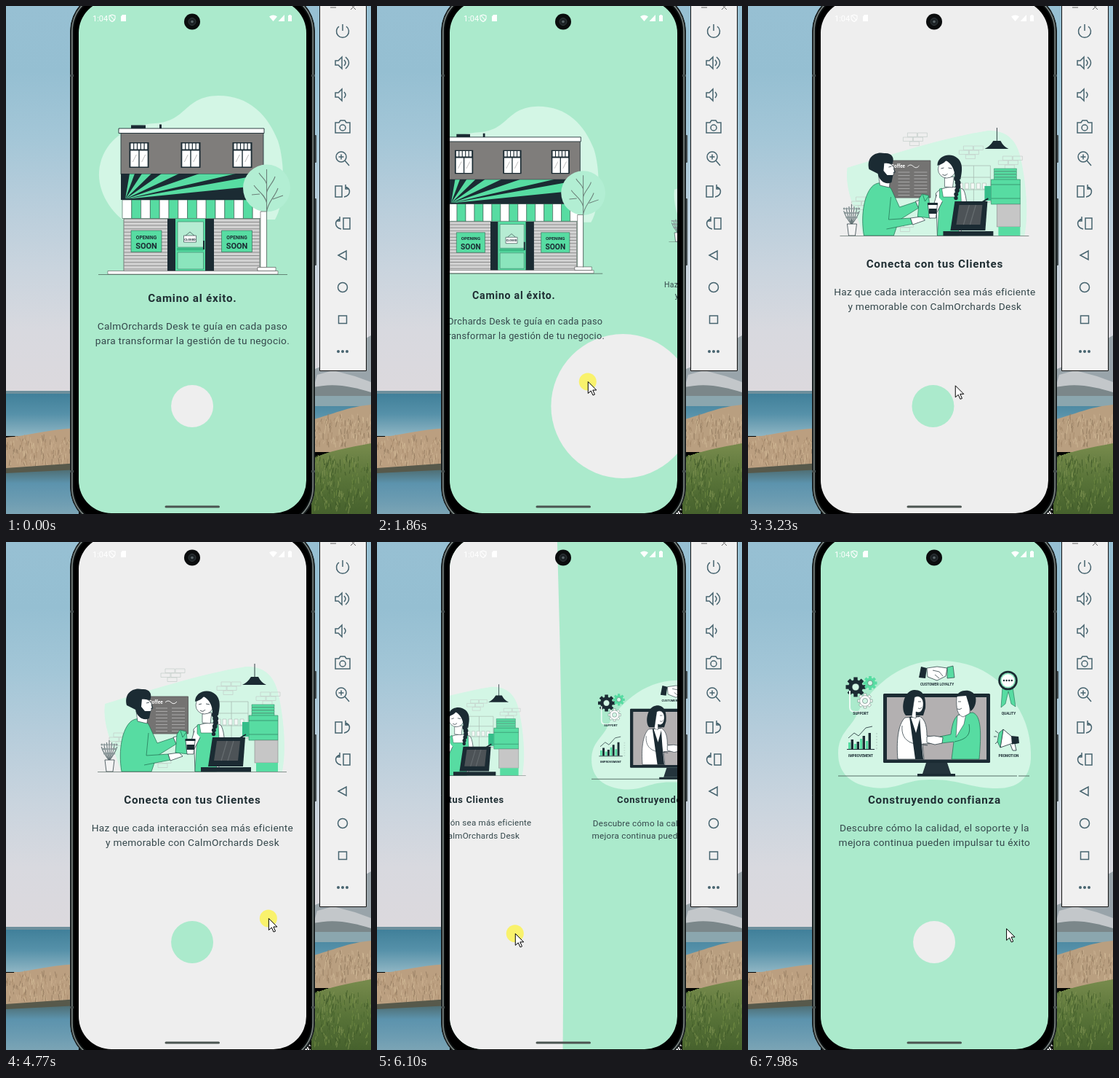
An HTML page with a canvas for the animation above (8 s loop, 502x697 px).

```html
<!DOCTYPE html>
<html lang="es">
<head>
<meta charset="utf-8">
<style>
html, body { margin: 0; width: 100%; height: 100%; overflow: hidden; background: #000; }
canvas { display: block; }
</style>
</head>
<body>
<canvas id="stage" width="502" height="697"></canvas>
<script>
const LOOP = 8000, W = 502, H = 697;
const INK = '#1b2b33', GREEN = '#57dca2', PALE = '#d3f6e5', MINT = '#abeacc', GREY = '#eeeeee';
const stage = document.getElementById('stage');
let c = stage.getContext('2d');

// ---------- drawing helpers ----------
function paint(p, fill, stroke, lw = 0.7) {
  if (fill) { c.fillStyle = fill; c.fill(p); }
  if (stroke) { c.strokeStyle = stroke; c.lineWidth = lw; c.stroke(p); }
}
const shape = (d, fill, stroke, lw) => paint(new Path2D(d), fill, stroke, lw);
function box(x, y, w, h, fill, stroke, lw, r = 0) {
  const p = new Path2D();
  p.roundRect(x, y, w, h, r);
  paint(p, fill, stroke, lw);
}
function disc(x, y, r, fill, stroke, lw) {
  const p = new Path2D();
  p.arc(x, y, r, 0, 7);
  paint(p, fill, stroke, lw);
}
function label(text, x, y, size, color, bold, spacing = 0, align = 'center') {
  c.font = `${bold ? 700 : 400} ${size}px Roboto, sans-serif`;
  c.letterSpacing = spacing + 'px';
  c.textAlign = align;
  c.fillStyle = color;
  c.fillText(text, x, y);
}
function vertical(y0, y1, ...colors) {
  const g = c.createLinearGradient(0, y0, 0, y1);
  colors.forEach((k, i) => g.addColorStop(i / (colors.length - 1), k));
  return g;
}
function seeded(seed) {
  return () => (seed = (seed * 16807) % 2147483647) / 2147483647;
}

// ---------- desktop, phone body, side panel ----------
function blades(x0, x1, y0, y1, n, colors) {
  const rnd = seeded(91 + n);
  c.lineWidth = 0.8;
  for (let i = 0; i < n; i++) {
    const x = x0 + rnd() * (x1 - x0), y = y0 + rnd() * (y1 - y0);
    c.strokeStyle = colors[i % colors.length];
    c.beginPath();
    c.moveTo(x, y);
    c.lineTo(x + rnd() * 4 - 2, y - 4 - rnd() * 5);
    c.stroke();
  }
}

function drawDesktop() {
  box(0, 0, W, 535, vertical(0, 535, '#97c0d3', '#95bfd2', '#a3c6d7', '#b7cddb', '#c9d4de', '#d8d9df', '#dcd9dd'));
  box(0, 530, W, 60, vertical(530, 590, '#3f7f99', '#5691a9', '#8fb5c3'));
  box(0, 528, 100, 4, '#6d8f9c');
  shape('M0 592C30 590 55 581 100 579V628L0 636Z', '#bb9f80');
  blades(0, 90, 596, 632, 170, ['#c9ae8d', '#a98c6d', '#d1b996', '#927a60']);
  box(0, 634, 100, 63, vertical(634, 697, '#4d6a6d', '#5c93ad', '#6a9bb1', '#7ba4b5'));
  shape('M0 634L100 627V636L0 641Z', '#57594b');
  shape('M420 500L440 492L470 470L502 452V533H420Z', '#99a4aa');
  shape('M428 506L450 500L480 508L502 516V534H420Z', '#c3c7ca');
  shape('M420 524C450 516 475 522 502 530V541H420Z', '#7b878a');
  box(420, 535, 82, 14, '#8ba6ae');
  shape('M420 568C450 560 470 550 502 547V612H420Z', '#b99f80');
  blades(424, 502, 566, 606, 150, ['#cbb292', '#a58a6b', '#d2bb99', '#8d775c']);
  shape('M420 622C445 610 470 606 502 600V697H420Z', vertical(605, 697, '#75894b', '#587338', '#46612d'));
  blades(424, 502, 622, 697, 230, ['#6f8a42', '#4a662e', '#3d5728', '#829653']);
}

function drawBody() {
  box(424, 177, 3, 38, '#3c4446', null, 0, 1);
  box(424, 264, 3, 92, '#3c4446', null, 0, 1);
  box(88.5, -20, 336, 735, '#0c1011', '#20282a', 1, 55);
  box(90.8, -18, 331.4, 731, null, '#79827f', 1.8, 53);
  box(93.5, -15, 326, 725, '#000', null, 0, 50);
  for (const y of [94, 637]) {
    box(88, y, 5, 3, '#444d4d');
    box(420, y, 5, 3, '#444d4d');
  }
}

function speaker(y, waves) {
  shape(`M453 ${y - 3}H457L462 ${y - 8}V${y + 8}L457 ${y + 3}H453Z`, null, '#47646f', 1.5);
  shape(`M465 ${y - 4}Q469 ${y} 465 ${y + 4}`, null, '#47646f', 1.5);
  if (waves > 1) shape(`M467 ${y - 8}Q476 ${y} 467 ${y + 8}`, null, '#47646f', 1.5);
}

function drawPanel() {
  const k = '#47646f', w = 1.5;
  box(431.5, -2, 64, 502.5, '#f0f0f0', '#111', 1);
  shape('M446 2H454M474 -2L481 5M481 -2L474 5', null, '#666', 1);
  shape('M458 28A8.5 8.5 0 1 0 468 28M463 25V34', null, k, w);
  speaker(78, 2);
  speaker(122, 1);
  shape('M453 160H458L460 157H466L468 160H473V174H453Z', null, k, w);
  disc(463, 167, 4, null, k, w);
  disc(461, 207, 7, null, k, w);
  shape('M466 212L472 219M457.5 207H464.5M461 203.5V210.5', null, k, w);
  shape('M453 247H462V262H453ZM465 262C474 260 475 251 467 248M467 245V251H472', null, k, w);
  shape('M464 291H473V306H464ZM461 306C452 304 451 295 459 292M459 289V295H454', null, k, w);
  shape('M457 342L468 336V348Z', null, k, w);
  disc(463, 386, 6.5, null, k, w);
  box(457.5, 425, 11, 10.5, null, k, w);
  for (const x of [457, 463, 469]) disc(x, 474, 2, k);
}

// ---------- illustrations ----------
function poster(x) {
  box(x - 21, 308, 42, 29.5, GREEN, '#2f5a4b', 0.6);
  label('OPENING', x, 319.5, 6.6, INK, true);
  label('SOON', x, 332.5, 11, INK, true);
}

function shutter(x, w) {
  box(x, 292, w, 72, '#d2d2d2', '#555', 0.7);
  for (let y = 296; y < 363; y += 4.6) box(x, y, w, 1, '#8b8b8b');
}

function drawShop() {
  shape('M160 293C138 275 122 245 130 215C138 185 165 163 205 161C250 158 244 124 292 123C335 123 360 150 374 185C384 215 384 270 370 293Z', PALE);
  box(172, 163.5, 20, 5, INK);
  box(211, 162.5, 3, 6, INK);
  box(158, 174, 196, 57, '#7f7d7b', INK, 0.8);
  box(155, 168, 200, 6.5, '#fff', INK, 0.9);
  for (const x of [169.5, 240.5, 311.5]) {
    box(x, 187, 27, 35, INK);
    for (let i = 0; i < 5; i++) box(x + 2 + i * 4.8, 188.5, 3.6, 8, '#fff');
    for (const dx of [1.8, 14.2]) {
      box(x + dx, 198.5, 11, 22, '#fff');
      shape(`M${x + dx + 3} 214L${x + dx + 8} 204`, null, '#bbb', 1);
    }
  }
  box(158, 230, 196, 36, INK);
  c.save();
  c.beginPath();
  c.rect(158, 230.5, 196, 34);
  c.clip();
  for (const [a, b, d, e] of [[170, 230, 177, 230], [187, 230, 200, 230], [214, 230, 238, 230], [266, 230, 316, 230], [354, 231, 354, 246]])
    shape(`M164 265L${a} ${b}L${d} ${e}Z`, GREEN);
  c.restore();
  shutter(162, 61);
  shutter(285, 64);
  poster(193);
  poster(317.5);
  box(222, 292, 64, 72, INK);
  box(233, 292, 41, 72, GREEN);
  box(236, 296, 35.5, 35, '#b6ecd3', '#397762', 0.6);
  box(236, 338, 35.5, 23, '#8be5bd', '#397762', 0.6);
  box(235, 332, 37, 3.5, '#3cba85');
  box(271, 322, 2, 12, INK);
  shape('M247 315L253 310L259 315', null, INK, 0.6);
  box(244.5, 315, 17, 9, '#fff', INK, 0.6);
  label('CLOSED', 253, 321.5, 4.2, INK, true);
  for (let i = 0; i < 15; i++) box(160 + i * 12.8, 266, 12.8, 25.5, i % 2 ? GREEN : '#fff', '#33584b', 0.6);
  box(158, 264.5, 196, 1.6, INK);
  box(140, 363.5, 234, 4.5, '#fff', '#555', 0.6);
  box(127, 368, 260, 0.8, '#4b6259');
  disc(358.5, 250, 32.5, '#b2eed3');
  box(350, 282, 8.5, 77, '#fff', '#444', 0.6);
  box(346, 358.5, 25, 5, '#fff', '#444', 0.6);
  shape('M358.5 359V224M358.5 283C359 270 370 262 374 250M358.5 270C356 258 346 254 341 246M358.5 256C360 248 368 242 370 234M358.5 244C356 236 351 235 348 229M367 265L381 260M349 258L338 259', null, '#6b8079', 1.1);
}

function bricks(x, y) {
  for (const [dx, dy] of [[0, 0], [14, 0], [-6, 6], [8, 6], [3, 12]]) box(x + dx, y + dy, 13, 5.5, null, '#c3cdc9', 0.7);
}

function drawCafe() {
  shape('M158 315C150 285 132 255 136 222C190 206 270 180 330 171C362 170 372 192 376 215C382 245 386 285 380 315Z', PALE);
  bricks(219, 174);
  bricks(296, 192);
  bricks(350, 206);
  bricks(148, 262);
  bricks(206, 292);
  box(286, 219, 47, 50, null, '#a9bbb3', 0.8);
  shape('M286 235H333M286 252H333M310 219V269', null, '#a9bbb3', 0.8);
  for (let i = 0; i < 5; i++) box(290 + i * 8, 243, 5, 8, '#f3f8f5', '#a9bbb3', 0.6);
  shape('M342 167V186', null, INK, 0.9);
  shape('M325 196Q332 193 337 185H347Q351 193 358 196Z', INK);
  box(188, 212, 62.5, 51, '#747372', '#555', 0.8);
  label('Coffee', 206, 222, 6.4, '#fff', true);
  shape('M219 220Q223 216 227 220T235 219', null, '#fff', 0.9);
  for (let y = 228; y < 260; y += 4.5) shape(`M206 ${y}H222M228 ${y}H246`, null, '#b7b7b6', 0.8);
  // espresso machine
  for (let y = 223; y < 238; y += 4) box(338, y, 31, 3.5, GREEN, '#2f7d5f', 0.5);
  box(334, 238, 40, 34, GREEN, '#2f7d5f', 0.6);
  shape('M334 245H374M334 264H374', null, '#2f7d5f', 0.7);
  box(342, 272, 32, 31, '#c6c6c6', '#777', 0.5);
  box(344, 303, 30, 12, GREEN);
  box(325, 247, 9, 20, '#35bd89');
  shape('M320 270L330 264', null, INK, 2);
  // plant
  for (let i = -3; i <= 3; i++) {
    shape(`M142 300Q${142 + i * 3} 288 ${142 + i * 3.6} ${272 + Math.abs(i) * 3}`, null, '#68777a', 1.1);
    for (let j = 0; j < 3; j++) disc(142 + i * (2.2 + j * 0.6), 290 - j * 6, 1.5, '#8b989a');
  }
  shape('M136 299H149L147 315H138Z', '#f4f4f4', INK, 0.7);
  // customer
  shape('M159 315C154 285 160 256 172 246C180 240 192 242 197 252L208 276L232 268L236 276L207 294L200 315Z', GREEN, '#226b50', 0.7);
  shape('M196 262L193 293L223 291L226 299L190 306', GREEN, '#226b50', 0.7);
  shape('M230 268L244 264L246 268L234 277ZM223 291L238 289L243 294L226 300Z', '#fff', INK, 0.7);
  shape('M179 232L181 246L194 249L195 236Z', '#fff', INK, 0.6);
  disc(190, 226, 11, '#fff', INK, 0.7);
  shape('M166 224C162 208 174 199 187 202C197 201 202 208 198 217L187 215L186 226L191 232L199 232L197 242C189 246 180 240 178 230Z', INK);
  shape('M193 221L197 220M200 223L202 228L199 229', null, INK, 0.8);
  // clerk
  shape('M258 257C265 247 288 246 296 252C301 262 301 280 300 292L290 315H260Z', '#fff', INK, 0.7);
  shape('M266 250L268 262L286 262L288 249L292 251L294 290L288 315H260L263 264L263 251Z', GREEN, '#226b50', 0.6);
  shape('M259 259L254 276L246 278L248 283L259 284L267 268', '#fff', INK, 0.7);
  shape('M270 236V248L281 249L283 234Z', '#fff', INK, 0.6);
  disc(273, 224, 12, '#fff', INK, 0.6);
  shape('M260 219C260 205 278 200 288 209C297 217 293 231 292 238L284 234C284 224 279 216 272 212C269 216 264 218 260 219Z', INK);
  for (let i = 0; i < 6; i++) disc(287 + Math.sin(i) * 1.5, 237 + i * 5.3, 4.2 - i * 0.3, INK);
  shape('M265 223L269 222M275 222L280 223M267 231Q271 234 274 230', null, INK, 0.8);
  // bag and cup
  shape('M235 264L239 258L248 260L251 291L233 289Z', GREEN, '#1d6a4e', 0.7);
  shape('M240 259L243 268L248 261', null, '#1d6a4e', 0.7);
  shape('M247 272H260L258 291H249Z', '#fff', INK, 0.7);
  box(246.5, 270, 14, 3, INK);
  box(248.5, 278, 10.5, 7, INK);
  // till
  shape('M284 268H329L326 308H278Z', INK);
  shape('M290 273H322L319 300H286Z', '#4d5357');
  shape('M304 273L296 300M313 273L305 300', null, '#666d70', 1.2);
  box(268, 309, 69, 6.5, INK);
  box(126, 315, 260, 0.8, '#62726c');
}

function gear(x, y, r, fill) {
  for (let i = 0; i < 8; i++) {
    c.save();
    c.translate(x, y);
    c.rotate(i * Math.PI / 4);
    box(-r * 0.2, -r, r * 0.4, r * 0.5, fill, fill === '#fff' ? '#67837a' : null, 0.6);
    c.restore();
  }
  disc(x, y, r * 0.74, fill, fill === '#fff' ? '#67837a' : null, 0.6);
  disc(x, y, r * 0.36, PALE, INK, 0.4);
}

function drawTrust() {
  shape('M124 290C124 262 142 255 150 236C165 205 205 163 262 162.5C318 163 352 190 368 222C384 245 390 272 389 298C387 325 370 338 343 338C305 338 290 325 250 326C215 326 205 341 172 337C142 333 124 318 124 290Z', PALE);
  box(124, 320.5, 246, 1, '#587068');
  box(372, 320.5, 15, 1, '#587068');
  gear(148, 199, 13.5, INK);
  gear(168, 193.5, 9.5, GREEN);
  gear(161, 218, 10, '#fff');
  shape('M140 204V227Q140 233 147 233H155', null, '#e9fbf3', 2);
  box(186, 208, 147, 95, INK, null, 0, 1.5);
  box(191, 213, 137, 85.5, '#b3b0b1');
  shape('M245 303H274L279 318H240Z', '#24343c');
  box(233, 318, 52, 3.4, INK);
  // left figure
  shape('M206 298C204 275 206 250 216 241L236 239C245 244 246 256 246 266L264 268V276L240 277L242 298Z', '#fff', INK, 0.7);
  shape('M222 240L230 298H241L238 268L236 239Z', INK);
  shape('M224 241L231 262L237 240Z', '#fff');
  shape('M217 238C209 230 214 204 228 203C242 202 245 214 244 228L241 238Z', INK);
  shape('M229 213C236 209 242 215 241 224C240 233 236 235 231 233L231 242L225 240Z', '#fff', INK, 0.5);
  shape('M234 219H238M234 228Q237 230 239 227', null, INK, 0.7);
  shape('M212 252C211 262 214 272 226 276L247 279', null, INK, 0.7);
  // right figure
  shape('M280 298L283 274L266 276L264 267L279 264C281 248 284 238 293 236L309 234C321 238 321 262 318 298Z', GREEN, '#1d6a4e', 0.7);
  shape('M288 238L286 268L297 250L300 235Z', '#fff', INK, 0.5);
  shape('M304 250C306 262 304 270 284 274', null, '#1d6a4e', 0.8);
  shape('M287 213C290 206 303 206 305 216L305 235L296 240C288 238 286 228 287 213Z', '#fff', INK, 0.6);
  shape('M287 212C288 203 308 199 313 212C315 222 310 230 306 232L303 221L300 211Z', INK);
  shape('M289 219H293M288 229Q291 231 294 228', null, INK, 0.7);
  shape('M246 267L256 266L268 268L267 276L257 278L246 275Z', '#fff', INK, 0.7);
  // handshake badge
  shape('M246 173L260 171L274 173L272 184L260 190L247 185Z', '#fff', INK, 0.7);
  shape('M254 176L263 178L268 184M257 182L263 187', null, INK, 0.7);
  shape('M238 171L246 173L244 187L235 186Z', INK);
  shape('M274 172L282 170L284 186L274 187Z', GREEN, INK, 0.6);
  // chart
  [[138, 9, 13], [146, 7, 10], [154, 14, 18], [162, 11, 22]].forEach(([x, a, b]) => {
    box(x, 284 - a, 3.2, a, GREEN);
    box(x + 3.6, 284 - b, 3.4, b, INK);
  });
  box(136, 284, 38, 0.9, INK);
  shape('M138 269L146 262L152 266L162 255L171 253', null, INK, 0.8);
  for (let y = 262; y < 284; y += 4) box(176, y, 2, 2, '#c0dfd1');
  // ribbon
  shape('M350 199L348 227L354 222L358 205L362 222L368 226L364 199Z', GREEN, '#1d6a4e', 0.6);
  disc(357.5, 190, 13.3, INK);
  disc(357.5, 190, 10.5, '#8ee5bf');
  disc(357.5, 190, 8.8, '#fff');
  for (let x = 352; x < 365; x += 3.6) disc(x, 190, 1.2, INK);
  // megaphone
  shape('M351 257L364 268V276L347 282Z', '#fff', INK, 0.8);
  shape('M351 257L347 282L343 274L345 262Z', GREEN, INK, 0.6);
  shape('M362 266L372 267L373 276L363 278Z', INK);
  shape('M361 278L364 286H369L367 277', '#fff', INK, 0.8);
  shape('M340 259L344 262M338 267H342M340 277L343 274', null, INK, 0.8);
  for (const [s, x, y] of [['SUPPORT', 155, 236.5], ['IMPROVEMENT', 155, 295], ['CUSTOMER LOYALTY', 260, 197], ['QUALITY', 358.5, 236.5], ['PROMOTION', 358.5, 295]])
    label(s, x, y, 4.8, INK, true);
}

// ---------- pages ----------
const pages = [
  { art: drawShop, y: 406, title: 'Camino al éxito.',
    body: ['CalmOrchards Desk te guía en cada paso', 'para transformar la gestión de tu negocio.'] },
  { art: drawCafe, y: 359, title: 'Conecta con tus Clientes',
    body: ['Haz que cada interacción sea más eficiente', 'y memorable con CalmOrchards Desk'] },
  { art: drawTrust, y: 359, title: 'Construyendo confianza',
    body: ['Descubre cómo la calidad, el soporte y la', 'mejora continua pueden impulsar tu éxito'] }
];
const PAGE_W = 313, MID = 256.4, MID_Y = 350, DP = 313 / 411;

function drawPage(page, offset) {
  const s = 1 - 0.3 * Math.abs(offset);
  c.save();
  c.translate(MID + offset * PAGE_W, MID_Y);
  c.scale(s, s);
  c.translate(-MID, -MID_Y);
  page.art();
  label(page.title, MID, page.y, 15.2, '#1f2e33', true, 0.76);
  page.body.forEach((line, i) => label(line, MID, page.y + 37.6 + i * 20.5, 13.7, '#34474b', false, 0.3));
  c.restore();
}

const tint = i => i % 2 ? GREY : MINT;

// The next colour grows out of the button; past halfway the old colour shrinks back into it.
function drawBackdrop(i, p) {
  const R = 28.2, cx = 255.3, grow = p < 0.5;
  const k = grow ? p * 2 : p * 2 - 1;
  const r = R + DP * 2 ** (15 * (grow ? k : 1 - k));
  const x = grow ? cx + r - (1 - k) * R : cx - r + k * R;
  box(99, -10, 316, 710, tint(grow ? i : i + 1));
  disc(x, 549, r, tint(grow ? i + 1 : i));
}

function drawSystemBars() {
  label('1:04', 119, 20.5, 11, '#fff', false, 0, 'left');
  shape('M146 12L150 13.5V17Q149.5 20 146 21.5Q142.500 20 142 17V13.5ZM143 13L149.500 20', null, '#fff', 1.1);
  shape('M160 12H165V21H158V14.500Z', '#fff');
  shape('M362 14.500Q367.500 10.500 373 14.500L367.500 21Z', '#fff');
  shape('M383 12V21H374.500Z', '#fff');
  box(388, 13, 5, 8, '#fff');
  box(389.3, 12, 2.4, 1, '#fff');
  box(218.500, 685.500, 75.500, 3, '#4b5551', null, 0, 1.5);
  disc(256, 21.500, 11, '#0b0d0e');
  disc(256, 21.500, 5, '#1c2225', '#31383b', 1);
  disc(256, 21.500, 1.8, '#5a6468');
}

// ---------- motion ----------
const pointerKeys = [
  [260, 411, 690], [670, 368, 515], [1470, 368, 515], [1860, 290, 515], [2570, 144, 517], [2800, 144, 517],
  [3440, 353, 522], [3770, 354, 522], [3910, 360, 516], [4110, 361, 516], [4770, 361, 516], [5540, 253, 525],
  [6250, 173, 540], [6700, 173, 540], [7170, 364, 540], [7300, 363, 540], [7780, 356, 530], [8000, 355, 530]
];
const drags = [{ from: 1470, to: 2570 }, { from: 4770, to: 6250 }];

function pointerAt(t) {
  const n = Math.max(1, pointerKeys.findIndex(k => k[0] > t));
  const [t0, x0, y0] = pointerKeys[n - 1], [t1, x1, y1] = pointerKeys[n];
  const u = (t - t0) / (t1 - t0);
  return [x0 + (x1 - x0) * u, y0 + (y1 - y0) * u];
}

// Overdamped page spring, from 1 down to 0.
const spring = s => 1.7 * Math.exp(-9.08 * s) - 0.7 * Math.exp(-22.03 * s);

function swipe({ from, to }, t) {
  if (t < from) return 0;
  const slop = 10;
  const moved = pointerAt(from)[0] - pointerAt(Math.min(t, to))[0] - slop;
  const p = Math.max(0, moved / PAGE_W);
  if (t <= to) return p;
  const left = (1 - p) * spring((t - to) / 1000);
  return left < 0.0008 ? 1 : 1 - left;
}

function drawPointer(t) {
  if (t < 260) return;
  const [x, y] = pointerAt(t);
  if (drags.some(d => t >= d.from && t <= d.to)) disc(x, y + 0.5, 12, 'rgba(250,242,85,.85)');
  c.save();
  c.translate(x + 0.5, y + 0.5);
  shape('M0 0V16L4 12.5L6.7 18.500L9.200 17.500L6.500 11.500H11.500Z', '#fff', '#000', 1);
  c.restore();
}

// ---------- frame ----------
const still = document.createElement('canvas');
still.width = W;
still.height = H;
const live = c;
c = still.getContext('2d');
drawDesktop();
drawBody();
drawPanel();
c = live;

const glass = new Path2D();
glass.roundRect(100, -8, 313, 704, 45);

function draw(t) {
  const pos = drags.reduce((sum, d) => sum + swipe(d, t), 0);
  const i = Math.floor(pos);
  c.drawImage(still, 0, 0);
  c.save();
  c.clip(glass);
  drawBackdrop(i, pos - i);
  pages.forEach((page, n) => {
    if (Math.abs(n - pos) < 1) drawPage(page, n - pos);
  });
  drawSystemBars();
  c.restore();
  drawPointer(t);
}

function tick() {
  draw(performance.now() % LOOP);
  requestAnimationFrame(tick);
}
tick();
</script>
</body>
</html>
```
